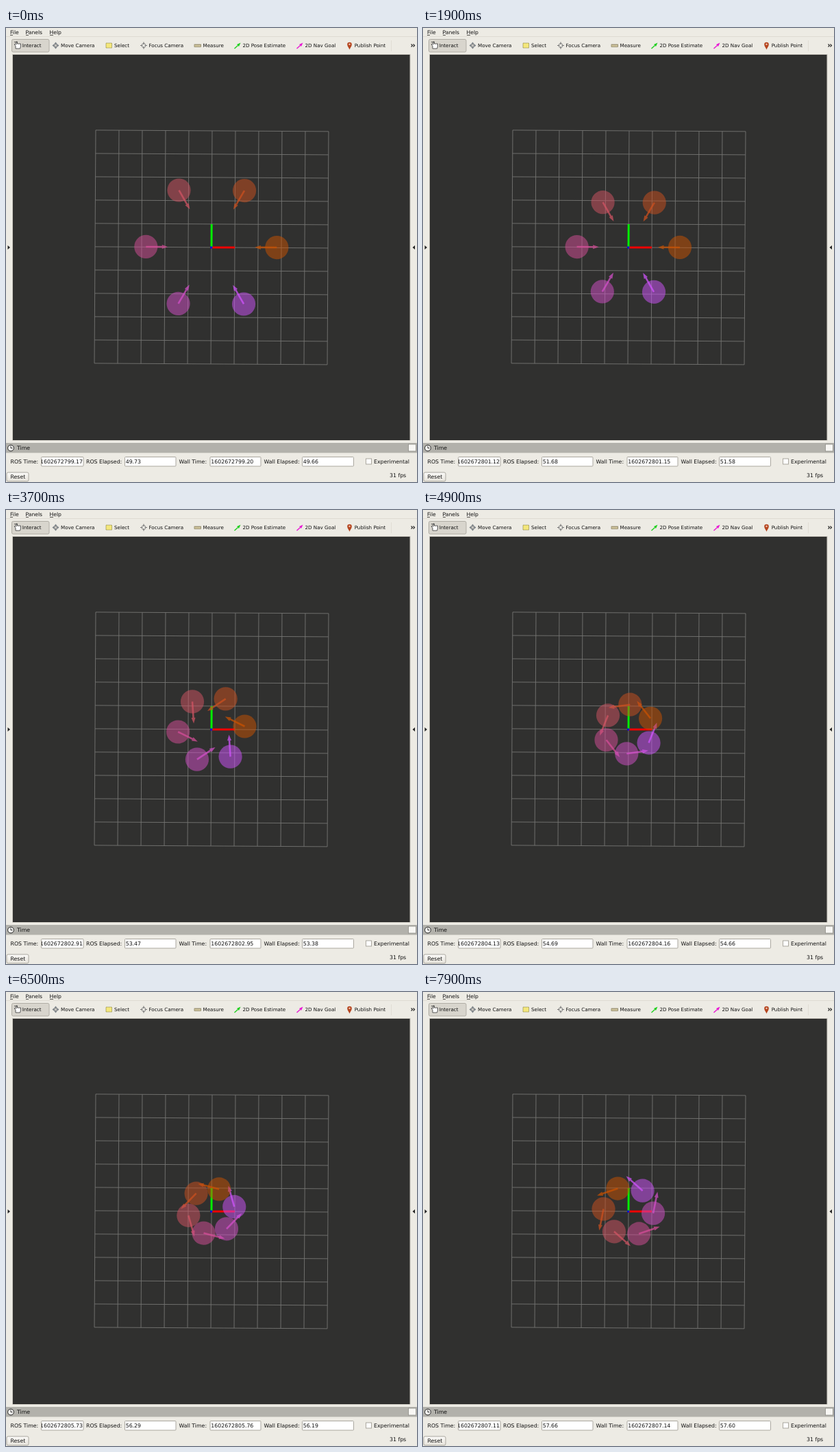
These frames come from a looping animation (600x662 px, 8000 ms). An HTML page:

```html
<!DOCTYPE html>
<html lang="en">
<head>
<meta charset="utf-8">
<title>Swarm view</title>
<style>
  html, body { margin: 0; width: 100%; height: 100%; overflow: hidden; background: #edebe4; }
  svg { display: block; width: 600px; height: 662px; }
  text { font-family: "DejaVu Sans", Verdana, sans-serif; font-size: 7.8px; fill: #111; text-rendering: geometricPrecision; white-space: pre; }
  .tools text { font-size: 7.15px; }
  .menu text { font-size: 7.65px; }
  .field { fill: #fff; stroke: #aaa79f; stroke-width: 1; }
  .thin { fill: none; stroke: #55534e; stroke-width: 1; }
</style>
</head>
<body>
<svg viewBox="0 0 600 662">
  <defs>
    <clipPath id="rosClip"><rect x="52" y="626" width="61" height="13"/></clipPath>
    <linearGradient id="btn" x2="0" y2="1">
      <stop offset="0" stop-color="#fbfaf8"/><stop offset="1" stop-color="#e6e3db"/>
    </linearGradient>
  </defs>
  <rect width="600" height="662" fill="#edebe4"/>

  <g class="menu">
    <text x="6" y="9">File</text><text x="28.5" y="9">Panels</text><text x="63.5" y="9">Help</text>
    <path class="thin" stroke-width=".7" d="M6 10.5h4M29 10.5h4M64 10.5h5"/>
  </g>
  <path d="M0 12.5H600" stroke="#dedbd3"/>

  <g class="tools">
    <rect x="8.5" y="16.5" width="54.500" height="18.500" rx="2" fill="#d8d5cd" stroke="#b0ada5"/>
    <path d="M14 30v-4l-2-2 1-1 2 1v-4h1.500v3h5v4l-1 3z" fill="#fff" stroke="#333" stroke-width=".8"/>
    <path d="M12 20.500h4" stroke="#333" stroke-width=".8"/>
    <path d="M67.500 25.500l3-2.500v5zM77.500 25.500l-3-2.500v5zM72.500 20.500l-2.500 3h5zM72.500 30.500l-2.500-3h5z" fill="#7b8288"/>
    <rect x="71" y="24" width="3" height="3" fill="#edebe4" stroke="#555" stroke-width=".6"/>
    <rect x="146" y="22" width="8.500" height="7" fill="#f4e77c" stroke="#86803c" stroke-width=".8" stroke-dasharray="1.500 .7"/>
    <circle cx="201" cy="25.500" r="3" fill="none" stroke="#888" stroke-width="1"/>
    <path d="M196 25.500h3.500M202.500 25.500h3.500M201 20.500v3.500M201 27v3.500" stroke="#777" stroke-width="1.200"/>
    <rect x="275" y="24" width="9.500" height="3.600" fill="#d8cda5" stroke="#7d7454" stroke-width=".7"/>
    <path d="M277 24v1.600M279 24v1.600M281 24v1.600M283 24v1.600" stroke="#7d7454" stroke-width=".6"/>
    <path d="M333.500 30l5-4.500" stroke="#1fd01f" stroke-width="1.400"/>
    <path d="M342.500 21.500l-2.500 5.500-3-3z" fill="#1fd01f"/>
    <path d="M424.500 30l5-4.500" stroke="#e815d4" stroke-width="1.400"/>
    <path d="M433.500 21.500l-2.500 5.500-3-3z" fill="#e815d4"/>
    <path d="M501.500 31.500c-1-3-3.300-4.500-3.300-7.500a3.300 3.300 0 0 1 6.600 0c0 3-2.300 4.500-3.300 7.500z" fill="#b5451f"/>
    <circle cx="501.500" cy="23.800" r="1.200" fill="#ecc9b8"/>
    <text x="23.700" y="28.300">Interact</text>
    <text x="80" y="28.300">Move Camera</text>
    <text x="158" y="28.300">Select</text>
    <text x="208.500" y="28.300">Focus Camera</text>
    <text x="287.500" y="28.300">Measure</text>
    <text x="345.500" y="28.300">2D Pose Estimate</text>
    <text x="436.500" y="28.300">2D Nav Goal</text>
    <text x="508.700" y="28.300">Publish Point</text>
    <path d="M562.500 18v16" stroke="#e0ddd5"/>
    <path d="M591.500 23.500l2 2-2 2M594.500 23.500l2 2-2 2" fill="none" stroke="#222" stroke-width="1.100"/>
  </g>

  <rect x="9" y="38" width="581.500" height="563.500" fill="#c9c6be"/>
  <rect x="10" y="39" width="579.500" height="562" fill="#30302f"/>
  <path d="M2.500 317v6l3.500-3zM597 317v6l-3.500-3z" fill="#222"/>

  <g transform="translate(300 319.900) rotate(.33)">
    <path id="grid" fill="none" stroke="#757573" stroke-width=".9"/>
    <path d="M0 0H34" stroke="#ee0000" stroke-width="3"/>
    <path d="M0 0V-34" stroke="#00ee00" stroke-width="3"/>
    <rect x="-1.800" y="-1.500" width="3" height="3" fill="#0000e6"/>
  </g>
  <g id="swarm" transform="translate(299.800 319.500) rotate(.33)"></g>

  <rect y="605" width="600" height="14.500" fill="#b2b1ab"/>
  <circle cx="7" cy="612.500" r="4.400" fill="#f5f5f2" stroke="#222" stroke-width="1"/>
  <path d="M7 609.500v3h2.500" fill="none" stroke="#222" stroke-width=".9"/>
  <text x="16" y="615.300">Time</text>
  <rect x="587.500" y="607" width="11" height="10" fill="#f8f7f4" stroke="#8f8e88" stroke-width=".8"/>

  <text x="6.500" y="635">ROS Time:</text>
  <text x="117" y="635">ROS Elapsed:</text>
  <text x="252.500" y="635">Wall Time:</text>
  <text x="376.500" y="635">Wall Elapsed:</text>
  <text x="537" y="635">Experimental</text>
  <rect class="field" x="51.500" y="625.500" width="61.500" height="13.500" rx="1"/>
  <rect class="field" x="173.500" y="625.500" width="74.500" height="13.500" rx="1"/>
  <rect class="field" x="298" y="625.500" width="74" height="13.500" rx="1"/>
  <rect class="field" x="432.500" y="625.500" width="75" height="13.500" rx="1"/>
  <rect class="field" x="525.500" y="628" width="8" height="8"/>
  <g clip-path="url(#rosClip)"><text id="ros" x="112" y="635" text-anchor="end"></text></g>
  <text id="rosElapsed" x="174.700" y="635"></text>
  <text id="wall" x="299.300" y="635"></text>
  <text id="wallElapsed" x="433.700" y="635"></text>

  <rect x="1" y="648" width="32" height="13" rx="2" fill="url(#btn)" stroke="#aaa79f"/>
  <text x="6.500" y="657.300">Reset</text>
  <text x="560" y="655">31 fps</text>
</svg>
<script>
const LOOP = 8000, TICK = 100, STEP = 6.77, START = 95.5;
const $ = id => document.getElementById(id);
const rad = deg => deg * Math.PI / 180;

// Heading of the first agent before each step, and when each step lands.
const headings = [180, 180, 180, 180, 173, 167.5, 163, 154, 144, 136,
  128.5, 137, 148, 156, 166, 174, 183, 191, 199];
const stepTimes = [300, 800, 1400, 2400, 2800, 3300, 3700, 4100, 4500, 4900,
  5200, 5600, 6000, 6400, 6800, 7100, 7500, 7900];

const poses = [];
let x = START, y = 0;
for (const h of headings) {
  poses.push({ x, y, h });
  x += STEP * Math.cos(rad(h));
  y += STEP * Math.sin(rad(h));
}

// Clock readings: time, ROS, ROS elapsed, wall, wall elapsed.
const EPOCH = 1602672000;
const clocks = [
  [0, 799.17, 49.73, 799.20, 49.66],
  [1900, 801.12, 51.68, 801.15, 51.58],
  [2900, 802.11, 52.67, 802.15, 52.61],
  [3700, 802.91, 53.47, 802.95, 53.38],
  [4900, 804.13, 54.69, 804.16, 54.66],
  [6500, 805.73, 56.29, 805.76, 56.19],
  [7900, 807.11, 57.66, 807.14, 57.60]
];

let lines = "";
for (let i = -5; i <= 5; i++) {
  lines += `M${i * 34} -170V170M-170 ${i * 34}H170`;
}
$("grid").setAttribute("d", lines);

const colors = ["204,82,0", "206,80,30", "212,84,100", "216,78,154", "214,80,204", "210,84,255"];
const add = (tag, attrs) => {
  const el = document.createElementNS("http://www.w3.org/2000/svg", tag);
  for (const key in attrs) el.setAttribute(key, attrs[key]);
  return $("swarm").appendChild(el);
};
const arrows = colors.map(c => add("path", {
  d: "M0 -1.3H23.5V-3L32 0L23.5 3V1.3H0Z", fill: `rgba(${c},.72)`
}));
const discs = colors.map(c => add("circle", { r: 17.1, fill: `rgba(${c},.5)` }));

function drawSwarm(t) {
  const pose = poses[stepTimes.filter(s => s <= t).length];
  colors.forEach((_, i) => {
    const turn = i * 60, c = Math.cos(rad(turn)), s = Math.sin(rad(turn));
    const px = pose.x * c - pose.y * s, py = -(pose.x * s + pose.y * c);
    const place = `translate(${px} ${py})`;
    arrows[i].setAttribute("transform", `${place} rotate(${-(pose.h + turn)})`);
    discs[i].setAttribute("transform", place);
  });
}

function drawClocks(t) {
  let i = 0;
  while (i < clocks.length - 2 && clocks[i + 1][0] <= t) i++;
  const a = clocks[i], b = clocks[i + 1], k = (t - a[0]) / (b[0] - a[0]);
  const read = n => a[n] + (b[n] - a[n]) * k;
  $("ros").textContent = (EPOCH + read(1)).toFixed(2);
  $("rosElapsed").textContent = read(2).toFixed(2);
  $("wall").textContent = (EPOCH + read(3)).toFixed(2);
  $("wallElapsed").textContent = read(4).toFixed(2);
}

function frame() {
  const t = Math.floor(performance.now() % LOOP / TICK) * TICK;
  drawSwarm(t);
  drawClocks(t);
  requestAnimationFrame(frame);
}
frame();
</script>
</body>
</html>
```
